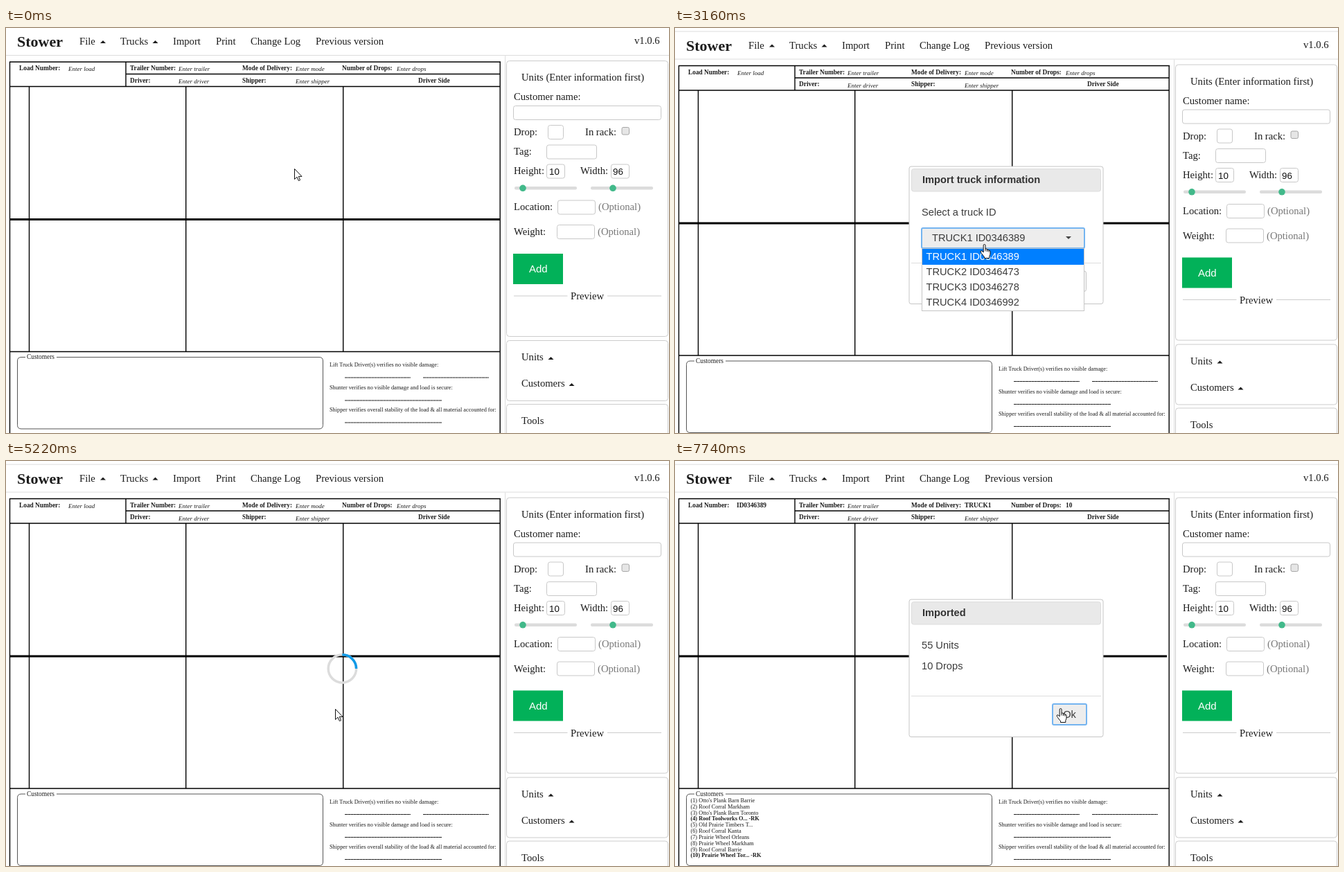
Write an HTML page that moves like this. It is 957 px wide and 585 px high and loops after 8000 ms.

```html
<!DOCTYPE html>
<html lang="en">
<head>
<meta charset="utf-8">
<title>Truck import</title>
<style>
html, body { margin: 0; width: 100%; height: 100%; overflow: hidden; background: #fff; }
svg { display: block; }
text { font: 14.67px "Liberation Serif", serif; fill: #1c1c1c; white-space: pre; }
.brand { font-size: 22px; font-weight: bold; }
.bold { font-size: 9.33px; font-weight: bold; }
.ital { font-size: 9px; font-style: italic; }
.legend { font-size: 9.33px; }
.tiny { font-size: 8.25px; }
.tiny.b { font-weight: bold; }
.dim { fill: #777; }
.ui { font-family: "Liberation Sans", sans-serif; fill: #3c3c3c; }
.title { font-weight: bold; fill: #333; }
.num { font-size: 13.33px; fill: #111; }
.add { font-size: 15px; fill: #fff; }
.mid { text-anchor: middle; }
.focus { fill: #ededed; stroke: #74b4f0; stroke-width: 2; }
</style>
</head>
<body>
<svg width="957" height="585" viewBox="0 0 957 585">
  <g id="page"></g>
  <g id="spinner" fill="none" stroke-width="3.5">
    <circle r="20.2" stroke="#dcdcdc"/>
    <path id="arc" d="M20.2 0A20.2 20.2 0 0 1 0 20.2" stroke="#0f9ae8"/>
  </g>
  <g id="ask"></g>
  <g id="done"></g>
  <circle id="click" r="11" fill="#f0e000" opacity=".68"/>
  <g id="cursor" fill="#fff" stroke="#111" stroke-linejoin="round">
    <path id="arrow" d="M.5 .5V15.5L4 12.2L6.4 17.6L8.6 16.6L6.3 11.4H11Z"/>
    <path id="hand" transform="translate(-5.5 0)" d="M4.7 2Q4.7 .5 6.1 .5Q7.5 .5 7.5 2V7Q9.8 6.6 10 8Q12 7.6 12.3 9Q14.5 8.8 14.5 11V14Q14.5 16 13.3 17.5V20.5H6V18.5Q3.5 16 2 13.5L.6 11.2Q.6 9.5 2.3 9.8L4.7 12ZM7.5 7V10.5M10 8V11M12.3 9V11.5"/>
  </g>
</svg>
<script>
const LOOP = 8000;
const $ = id => document.getElementById(id);

const text = (x, y, s, cls = '', id = '') =>
  `<text x="${x}" y="${y}" class="${cls}" id="${id}">${s}</text>`;
const rect = (x, y, w, h, fill, stroke = 'none', r = 0, id = '', cls = '') =>
  `<rect x="${x}" y="${y}" width="${w}" height="${h}" rx="${r}" fill="${fill}" stroke="${stroke}" id="${id}" class="${cls}"/>`;
const line = (x1, y1, x2, y2, color = '#000', w = 1.4, extra = '') =>
  `<line x1="${x1}" y1="${y1}" x2="${x2}" y2="${y2}" stroke="${color}" stroke-width="${w}" ${extra}/>`;
const field = (x, y, w, h = 20) => rect(x + .5, y + .5, w - 1, h, '#fff', '#c8c8c8', 3);
const up = (x, y) => `<path d="M${x} ${y}h8l-4 -4z" fill="#1c1c1c"/>`;

function header() {
  const items = [[106, 'File'], [165, 'Trucks'], [303, 'Print'], [353, 'Change Log'], [447, 'Previous version']];
  return line(0, -.5, 957, -.5, '#ddd', 1) + line(0, 39.5, 957, 39.5, '#ddd', 1) + line(720.5, 40, 720.5, 600, '#ddd', 1) +
    text(16, 27, 'Stower', 'brand') + items.map(([x, s]) => text(x, 24, s)).join('') +
    text(241, 24, 'Import', '', 'menu') + up(136, 22) + up(211.5, 22) + text(907, 23, 'v1.0.6');
}

function sheet() {
  const labels = [
    [19, 61, 'Load Number:'], [179, 61, 'Trailer Number:'], [341, 61, 'Mode of Delivery:'], [485, 61, 'Number of Drops:'],
    [179, 78.5, 'Driver:'], [341, 78.5, 'Shipper:'], [595, 78.5, 'Driver Side']];
  const hints = [[249, 62, 'Enter trailer'], [249, 80, 'Enter driver'], [418, 80, 'Enter shipper']];
  const blanks = [[90, 62, 'Enter load'], [418, 62, 'Enter mode'], [564, 62, 'Enter drops']];
  const filled = [[89, 61, 'ID0346389'], [418, 61, 'TRUCK1'], [564, 61, '10']];
  const shops = ["Otto's Plank Barn Barrie", 'Roof Corral Markham', "Otto's Plank Barn Toronto", 'Roof Toolworks O... -RK',
    'Old Prairie Timbers T...', 'Roof Corral Kanta', 'Prairie Wheel Orleans', 'Prairie Wheel Markham',
    'Roof Corral Barrie', 'Prairie Wheel Tor... -RK'];
  const all = (list, cls) => list.map(([x, y, s]) => text(x, y, s, cls)).join('');
  const sign = (x1, x2, y) => line(x1, y, x2, y, '#222', 1.1, 'stroke-dasharray="4 .25"');
  return line(5, 49, 714, 49) + line(5.5, 49, 5.5, 600) + line(713.2, 49, 713.2, 600) +
    line(173, 49, 173, 84.5) + line(173, 66.5, 713, 66.5) + line(5, 84.5, 713, 84.5) +
    [33.5, 259.7, 486.7].map(x => line(x, 84.5, x, 467.5)).join('') +
    line(5, 276.5, 713, 276.5, '#000', 3, 'id="rail"') + line(5, 467.5, 713, 467.5) +
    all(labels, 'bold') + all(hints, 'ital') +
    `<g id="blank">${all(blanks, 'ital')}</g>` +
    `<g id="filled">${all(filled, 'bold')}${shops.map((s, i) =>
      text(22.5, 487.5 + i * 8.83, `(${i + 1}) ${s}`, s.endsWith('RK') ? 'tiny b' : 'tiny')).join('')}</g>` +
    `<path d="M28 475.5H22q-5.5 0 -5.5 5.5V573.5q0 5.5 5.5 5.5H452q5.5 0 5.5 -5.5V481q0 -5.5 -5.5 -5.5H73" fill="none" stroke="#555"/>` +
    text(30, 478, 'Customers', 'legend') +
    text(467, 489, 'Lift Truck Driver(s) verifies no visible damage:', 'tiny') +
    text(467, 522, 'Shunter verifies no visible damage and load is secure:', 'tiny') +
    text(467, 554, 'Shipper verifies overall stability of the load &amp; all material accounted for:', 'tiny') +
    sign(489, 584, 505) + sign(602, 697, 505) + sign(489, 629, 538) + sign(489, 629, 570);
}

function panel() {
  const box = (y, h) => rect(722.5, y, 233, h, '#fff', '#ccc', 4);
  const slider = (x, knob) => rect(x, 229, 90, 4.5, '#dcdcdc', 'none', 2) +
    `<circle cx="${knob}" cy="231.3" r="4.8" fill="#42b98a"/>`;
  const labels = [[744, 76, 'Units (Enter information first)'], [733, 104, 'Customer name:'], [733, 155, 'Drop:'],
    [836, 155, 'In rack:'], [733, 183, 'Tag:'], [733, 211, 'Height:'], [829, 211, 'Width:'], [733, 263, 'Location:'],
    [733, 299, 'Weight:'], [815, 392, 'Preview'], [744, 480, 'Units'], [744, 518, 'Customers'], [744, 572, 'Tools']];
  return box(47.5, 398) + box(451.5, 87) + box(543.5, 80) +
    labels.map(([x, y, s]) => text(x, y, s)).join('') +
    field(732, 112, 214) + field(782, 140, 23) + field(780, 168.5, 73) + field(780, 196.5, 27) + field(873, 196.5, 27) +
    field(796, 248.5, 55) + field(795, 284, 55) + rect(889, 143.5, 10.5, 10.5, '#e6e6e6', '#a6a6a6', 2) +
    text(784, 212, '10', 'ui num') + text(876, 212, '96', 'ui num') +
    slider(734, 746) + slider(844, 876) +
    text(855, 263, '(Optional)', 'dim') + text(854, 299, '(Optional)', 'dim') +
    rect(732, 326, 72, 44, '#02b159') + text(755, 353, 'Add', 'ui add') +
    line(733, 387, 810.5, 387, '#ccc', 1) + line(868, 387, 946, 387, '#ccc', 1) +
    up(782.5, 479) + up(812.5, 517);
}

const frame = title =>
  rect(338, 200, 280, 198.5, '#fff', '#c5c5c5', 3) + rect(341.5, 203.5, 273, 32.5, '#e9e9e9', '#dcdcdc', 3) +
  text(357, 224, title, 'ui title') + line(341, 339.5, 615, 339.5, '#ddd', 1);
const button = (x, w, s, id = '') =>
  rect(x, 351, w, 29.5, '#f6f6f6', '#c5c5c5', 3, id) + text(x + w / 2, 371, s, 'ui mid', id && id + 'Text');

const trucks = ['TRUCK1 ID0346389', 'TRUCK2 ID0346473', 'TRUCK3 ID0346278', 'TRUCK4 ID0346992'];

$('page').innerHTML = header() + sheet() + panel();
$('ask').innerHTML = frame('Import truck information') + text(356, 270.5, 'Select a truck ID', 'ui') +
  rect(356.5, 289.5, 234, 28, '#f6f6f6', '#c5c5c5', 3) + rect(356, 289, 235, 29, '', '', 2, 'focus', 'focus') +
  text(371, 308, trucks[0], 'ui') + '<path d="M564 301h8l-4 4z" fill="#444"/>' +
  button(440, 71.5, 'Import', 'go') + button(517.5, 76, 'Cancel') +
  '<g id="list">' + rect(356.5, 318.5, 234, 90, '#fff', '#c5c5c5') +
  rect(357, 319, 233, 23, '#007fff', 'none', 0, 'hover') +
  trucks.map((s, i) => text(362.5, 335 + i * 22, s, 'ui row')).join('') + '</g>';
$('done').innerHTML = frame('Imported') + text(356, 270.5, '55 Units', 'ui') + text(356, 301, '10 Drops', 'ui') +
  rect(545, 351, 49, 30, '', '', 2, '', 'focus') + text(569.5, 371, 'Ok', 'ui mid');

// time, x, y of the pointer tip
const path = [
  [450, 416, 203], [960, 266, 15], [1060, 266, 15], [1210, 265, 18], [1780, 265, 18], [2080, 404, 238], [2160, 406, 242],
  [2550, 446, 306], [3150, 446, 306], [3160, 446, 312], [3230, 446, 314], [3340, 446, 352], [3560, 446, 352],
  [3800, 446, 331], [4040, 446, 331], [4430, 475, 358], [7400, 475, 359], [7520, 500, 345], [7640, 538, 349], [7740, 556, 357]];

const clamp = v => Math.max(0, Math.min(1, v));
const ramp = (t, a, b) => clamp((t - a) / (b - a));
const within = (t, ...spans) => spans.some(([a, b]) => t >= a && t < b);
const show = (id, on) => $(id).setAttribute('visibility', on ? 'visible' : 'hidden');
const set = (id, attrs) => { for (const k in attrs) $(id).setAttribute(k, attrs[k]); };

function pointer(t) {
  const i = path.findIndex(k => k[0] > t);
  if (i === 0) return path[0].slice(1);
  if (i < 0) return path[path.length - 1].slice(1);
  const [a, x, y] = path[i - 1], [b, x2, y2] = path[i];
  let p = ramp(t, a, b);
  if (b - a > 200) p = p * p * (3 - 2 * p);
  return [x + (x2 - x) * p, y + (y2 - y) * p];
}

function draw(t) {
  const [x, y] = pointer(t).map(Math.round);
  // the page slides down in five steps, snapped to half pixels
  const step = Math.floor(5 * ramp(t, 820, 1210));
  set('page', { transform: `translate(0 ${Math.round(step * 2.2) / 2})` });

  const over = within(t, [880, 1200]);
  $('menu').style.textDecoration = over ? 'underline' : 'none';
  $('menu').style.fill = over ? '#555' : '';

  set('ask', { opacity: ramp(t, 1290, 1460) * (1 - ramp(t, 4590, 4900)) });
  show('focus', t < 4400);

  show('list', within(t, [2690, 4040]));
  const row = y > 341 ? 1 : 0;
  set('hover', { y: 319 + row * 22 });
  document.querySelectorAll('.row').forEach((el, i) => { el.style.fill = i === row ? '#fff' : ''; });

  const pressed = t >= 4480;
  set('go', { fill: pressed ? '#007fff' : t >= 4380 ? '#ededed' : '#f6f6f6', stroke: pressed ? '#0070e6' : '#c5c5c5' });
  $('goText').style.fill = pressed ? '#fff' : '';

  const loaded = t >= 6660;
  set('spinner', { transform: 'translate(485.4 300)', opacity: ramp(t, 4800, 4960) * (1 - ramp(t, 6580, 6680)) });
  set('arc', { transform: `rotate(${-15 + (t - 6430) * .36})` });
  show('blank', !loaded);
  show('filled', loaded);
  set('rail', { x2: loaded ? 710 : 713 });
  set('done', { opacity: ramp(t, 6660, 6820) });

  show('click', within(t, [1130, 1205], [2550, 2690], [3800, 4040], [4490, 4600]));
  set('click', { cx: x, cy: y + 1 });
  const hand = within(t, [2440, 4110], [4370, 4620], [7640, LOOP]);
  show('hand', hand);
  show('arrow', !hand);
  set('cursor', { transform: `translate(${x} ${y})` });
}

const start = performance.now();
function tick() {
  draw((performance.now() - start) % LOOP);
  requestAnimationFrame(tick);
}
tick();
</script>
</body>
</html>
```
